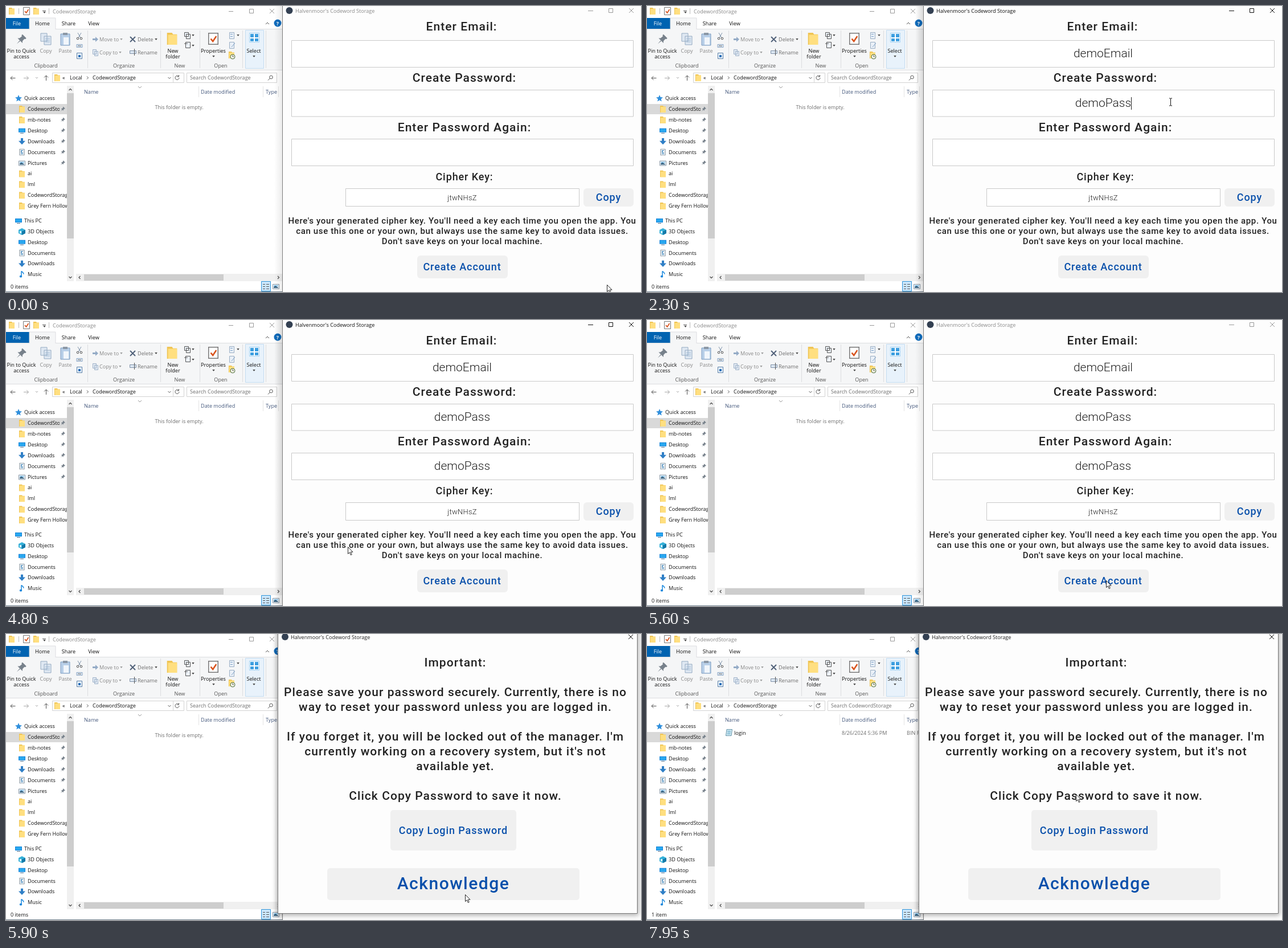
An HTML page for the animation above (8 s loop, 1115 by 502 pixels).

```html
<!DOCTYPE html>
<html lang="en">
<head>
<meta charset="utf-8">
<title>Creating an account</title>
<style>
  html, body { margin: 0; width: 100%; height: 100%; overflow: hidden; background: #fff; }
  svg { display: block; width: 100vw; height: 100vh; }
  text { font: 9.1px "Open Sans", "Noto Sans", sans-serif; fill: #111; white-space: pre; }
  .mid { text-anchor: middle; }
  .dim, .dim text { fill: #888; }
  .soft { fill: #6d6d6d; }
  .group { fill: #555; text-anchor: middle; }
  .head { fill: #44587c; }
  .line { fill: none; stroke: #555; }
  .rule { stroke: #dcdde0; fill: none; }
  .din text { font: 450 21px Roboto, sans-serif; letter-spacing: .05em; text-anchor: middle; fill: #222; }
  .din .s18 { font-size: 18px; }
  .din .s15 { font-size: 15px; letter-spacing: .043em; }
  .din .blue { fill: #0a50ab; }
  .din .typed { font-weight: 300; letter-spacing: 0; }
  .din .key { font-size: 13px; letter-spacing: .02em; font-weight: 300; }
  .field { fill: #fff; stroke: #c9c9c9; }
  .button { fill: #f0f0f0; }
  #title text { fill: #8a8a8a; }
  #title path { stroke: #999; fill: none; }
  #title.active text { fill: #111; }
  #title.active path { stroke: #111; }
</style>
</head>
<body>
<svg viewBox="0 0 1115 502" preserveAspectRatio="none">
  <defs>
    <symbol id="folder" viewBox="0 0 12 12" width="12" height="12">
      <path d="M1 0h5l1 1.500h4V12H1z" fill="#efc453"/><path d="M2 2h9v10H2z" fill="#ffdf80"/>
    </symbol>
    <symbol id="desktop" viewBox="0 0 12 12" width="12" height="12">
      <path d="M0 2h12v7H0z" fill="#1683d8"/><path d="M1 3h10v5H1z" fill="#28a8f0"/><path d="M3 10.500h6" stroke="#4a6d8c"/>
    </symbol>
    <symbol id="download" viewBox="0 0 12 12" width="12" height="12">
      <path d="M4 0h4v5h4l-6 6.500L0 5h4z" fill="#2f7fc6"/>
    </symbol>
    <symbol id="document" viewBox="0 0 12 12" width="12" height="12">
      <path d="M2 .5h8v11H2z" fill="#f7fafc" stroke="#7d8a96"/><path d="M4 3h4M4 7h4M4 9h4" stroke="#3c82b8"/><path d="M4 4h2v2H4z" fill="#3c82b8"/>
    </symbol>
    <symbol id="picture" viewBox="0 0 12 12" width="12" height="12">
      <path d="M.5 2.500h11v8H.5z" fill="#fff" stroke="#8293a3"/><path d="M2 4h8v2H2z" fill="#8ac6ee"/><path d="M2 9V7l3-2 5 3v1z" fill="#3a6685"/>
    </symbol>
    <symbol id="cube" viewBox="0 0 12 12" width="12" height="12">
      <path d="M0 3l6-3 6 3v6l-6 3-6-3z" fill="#35b0d8"/><path d="M6 5.500L12 3v6l-6 3z" fill="#1579a8"/><path d="M2 5h3v4H2z" fill="#d8f3fb"/>
    </symbol>
    <symbol id="note" viewBox="0 0 12 12" width="12" height="12">
      <path d="M5 9.500V0c1 2 4 2 4 5.500" fill="none" stroke="#1686dc" stroke-width="1.500"/><ellipse cx="4" cy="9.500" rx="2.200" ry="1.900" fill="#1686dc"/>
    </symbol>
    <symbol id="star" viewBox="0 0 12 12" width="12" height="12">
      <path d="M6 0l1.700 4 4.300.4-3.300 2.800 1 4.300L6 9.200l-3.700 2.300 1-4.300L0 4.400 4.300 4z" fill="#2f8fdc"/>
    </symbol>
    <symbol id="pin" viewBox="0 0 12 12" width="12" height="12">
      <path d="M7 1l4 4-1 1-1-.3L7 8v2L2 5h2l2.500-2L6 2zM4.300 7L1 11l4-3.300z" fill="#77818b"/>
    </symbol>
    <symbol id="check" viewBox="0 0 12 14" width="12" height="14">
      <path d="M.5.5h11v13H.5z" fill="#fff" stroke="#777"/><path d="M3 7l2.500 3L9.500 4" fill="none" stroke="#d9541e" stroke-width="1.700"/>
    </symbol>
    <symbol id="sheets" viewBox="0 0 20 22" width="20" height="22">
      <path d="M1 1h11v14H1zM7 6h12v15H7z" fill="#dfe8f2" stroke="#94aac2"/><path d="M9 10h8M9 13h8M9 16h8" stroke="#9db7d2"/>
    </symbol>
    <symbol id="down" viewBox="0 0 6 4" width="5" height="3"><path d="M0 0h6L3 4z" fill="#444"/></symbol>
    <linearGradient id="edge"><stop offset="0" stop-color="#000" stop-opacity="0"/><stop offset="1" stop-color="#000" stop-opacity=".25"/></linearGradient>
    <filter id="blur" x="-10%" y="-10%" width="120%" height="120%"><feGaussianBlur stdDeviation="4"/></filter>
    <clipPath id="explorerClip"><path d="M0 0h485v502H0z"/></clipPath>
    <clipPath id="typeClip"><path d="M450 140h28v60h-28z"/></clipPath>
    <clipPath id="sideClip"><path d="M0 140h107v343H0z"/></clipPath>
    <clipPath id="pinClip"><path d="M0 140h94v343H0z"/></clipPath>
  </defs>
  <rect width="1115" height="502" fill="#fff"/>

  <g clip-path="url(#explorerClip)">
    <use href="#folder" x="4" y="3"/><use href="#check" x="30" y="2"/><use href="#folder" x="47" y="3"/>
    <path class="line" d="M22.500 4v10M75.500 4v10" style="stroke:#bbb"/><path class="line" d="M64 8.500h6"/><use href="#down" x="65" y="10"/>
    <text class="dim" x="82" y="13">CodewordStorage</text>
    <path class="line" d="M391 9.500h8M427.500 5.500h7v7h-7zM463 5l8 8M471 5l-8 8" style="stroke:#999"/>

    <path d="M0 40h485v72H0z" fill="#f5f6f7"/><path d="M0 21h41v19H0z" fill="#0063b1"/>
    <path d="M41 41V21h46v20" fill="#f5f6f7" stroke="#dcdde0"/><path class="rule" d="M0 40.500h41M87 40.500h398M0 112.500h485"/>
    <text class="mid" x="19" y="34" style="fill:#fff">File</text><text class="mid" x="64" y="34">Home</text>
    <text class="mid" x="110" y="34">Share</text><text class="mid" x="154" y="34">View</text>
    <path class="line" d="M456 32l3-3 3 3"/><circle cx="477" cy="30" r="6.500" fill="#0f6cbd"/>
    <text class="mid" x="477" y="33.500" style="fill:#fff;font-weight:700">?</text>
    <path class="rule" d="M143.500 43v66M271.500 43v66M340.500 43v66M415.500 43v66M456.500 43v66"/>

    <use href="#pin" transform="translate(17 48) scale(1.700)"/><use href="#sheets" x="60" y="47"/>
    <path d="M96 49h16v20H96z" fill="#b8cfe8" stroke="#7c9cc0"/><path d="M100 47h8v4h-8z" fill="#8b97a5"/><path d="M101 55h9v13h-9z" fill="#f1f6fb"/>
    <path class="line" d="M126 47l5 9M132 47l-5 9" style="stroke:#8296ad"/><circle cx="126" cy="57" r="1.800" class="line"/><circle cx="132" cy="57" r="1.800" class="line"/>
    <path d="M124 67.500h10v5h-10z" fill="#e2edf8" stroke="#8ba5c2"/><path class="line" d="M126 70.500l2-1 2 1 2-1"/>
    <path d="M124.500 82.500h9v10h-9z" fill="#e9f2fb" stroke="#5b7fa6"/><path d="M127 86h4v4h-4z" fill="#2b70b8"/>
    <text class="mid" x="27" y="82">Pin to Quick</text><text class="mid" x="27" y="92">access</text>
    <g class="dim"><text class="mid" x="70" y="82">Copy</text><text class="mid" x="104" y="82">Paste</text>
      <text x="164" y="62">Move to</text><text x="164" y="85">Copy to</text></g>
    <g opacity=".5"><use href="#down" x="200" y="57"/><use href="#down" x="198" y="80"/></g>
    <path d="M152 57h5v-3l5 4.500-5 4.500v-3h-5z" fill="#94abc6"/><path d="M152.500 76.500h6v8h-6zM155.500 79.500h6v8h-6z" fill="#e2eaf3" stroke="#9fb2c8"/>
    <path d="M218 54l9 9M227 54l-9 9" stroke="#51627a" stroke-width="2"/><path d="M217.500 78.500h11v5h-11z" fill="#dbe6f2" stroke="#7f91a7"/><path class="line" d="M225.500 75v12"/>
    <text class="soft" x="231" y="62">Delete</text><text class="soft" x="231" y="85">Rename</text><use href="#down" x="261" y="57"/>
    <use href="#folder" transform="translate(281 47) scale(1.750)"/>
    <path class="line" d="M313.500 46.500h7v7h-7zM316.500 49.500h7v8h-7zM315.500 63.500h8v10h-8zM319 66h-6" style="fill:#edf3f9"/><use href="#down" x="326" y="50"/><use href="#down" x="326" y="68"/>
    <text class="mid" x="293" y="82">New</text><text class="mid" x="293" y="92">folder</text>
    <use href="#check" transform="translate(355 47) scale(1.500)"/><text class="mid" x="364" y="82">Properties</text><use href="#down" x="362" y="87"/>
    <path d="M392.500 46.500h8v11h-8zM392.500 63.500h8v11h-8z" fill="#eaf0f7" stroke="#9aaec4"/><path d="M394 49.500h4M394 53.500h4M396 72l6-7" stroke="#7ea2c8"/><use href="#down" x="405" y="50"/>
    <use href="#folder" x="390" y="80"/><circle cx="398" cy="89" r="4" fill="#f4f6e8" stroke="#4d6b3c"/><path class="line" d="M398 86.500V89h2"/>
    <path d="M420.500 42.500h32v67h-32z" fill="#e8f2fb" stroke="#c3dcf1"/>
    <path d="M427.500 47.500h17v16h-17z" fill="#fff" stroke="#9fd0f2"/><path d="M429 49h6v6h-6zM437 49h6v6h-6zM429 57h6v5h-6zM437 57h6v5h-6z" fill="#3c9ee0"/>
    <text class="mid" x="435" y="82">Select</text><use href="#down" x="433" y="87"/>
    <text class="group" x="70" y="108">Clipboard</text><text class="group" x="207" y="108">Organize</text>
    <text class="group" x="305" y="108">New</text><text class="group" x="377" y="108">Open</text>

    <path class="line" d="M16.500 126.500H8M11.500 123L8 126.500l3.500 3.500M70.500 131v-9M67 125.500l3.500-3.500 3.500 3.500"/>
    <path class="line" d="M31 126.500h8.500M36 123l3.500 3.500-3.500 3.500M52 125l2 2 2-2" style="stroke:#aaa"/>
    <path class="rule" d="M81.500 117.500h231v17h-231zM293.500 118v17M317.500 117.500h158v17h-158z" style="stroke:#d2d2d2"/>
    <use href="#folder" x="84" y="120"/><text x="99" y="129">«</text><text x="112" y="129">Local</text><text x="152" y="129">CodewordStorage</text>
    <path class="line" d="M142 123.500l2.500 2.500-2.500 2.500M284.500 125l2.500 2.500 2.500-2.500M303 123.500a3.500 3.500 0 1 0 1 2.500M303.500 121v3h-3"/>
    <text class="soft" x="323" y="129">Search CodewordStorage</text><circle class="line" cx="465.500" cy="125" r="2.800"/><path class="line" d="M463.500 127l-3.500 3.500"/>

    <path class="rule" d="M338.500 141v19M451.500 141v19M478.500 141v19" style="stroke:#e4e4e4"/><path class="line" d="M232 141l3 3 3-3" style="stroke:#999"/>
    <text class="head" x="137" y="154">Name</text><text class="head" x="342" y="154">Date modified</text><text class="head" x="456" y="154">Type</text>
    <text id="empty" class="mid soft" x="304" y="181">This folder is empty.</text>
    <g id="file">
      <path d="M140 167.500h9.500l-1.500 11h-9.500z" fill="#d9eef5" stroke="#5f91a8"/><path d="M141 170.500h6M141 173h6M140.500 175.500h6" stroke="#4f9cc0"/>
      <text x="153" y="177">login</text><text class="soft" x="342" y="177">8/26/2024 5:36 PM</text>
      <text class="soft" x="456" y="177" clip-path="url(#typeClip)">BIN File</text>
    </g>

    <path d="M0 172h107v18H0z" fill="#d9d9d9"/>
    <g id="sidebar" clip-path="url(#sideClip)"></g>
    <path d="M107 140h12v343h-12zM123 470h362v13H123z" fill="#f0f0f0"/><path d="M107 153h12v255h-12zM137 471h245v11H137z" fill="#cdcdcd"/>
    <path class="line" d="M110.500 148l2.500-2.500 2.500 2.500M110.500 475l2.500 2.500 2.500-2.500M130.500 474l-2.500 2.500 2.500 2.500M477 474l2.500 2.500-2.500 2.500" stroke-width="1.300"/>
    <text id="status" x="8" y="496">0 items</text>
    <path d="M448.500 483.500h16v17h-16z" fill="#cce8ff" stroke="#2f94d8"/><path class="line" d="M451 488.500h4M451 492.500h4M451 496.500h4M457 488.500h5M457 492.500h5M457 496.500h5"/>
    <use href="#picture" x="468" y="486"/><path d="M0 501.500h485" stroke="#72828f"/>
  </g>

  <rect id="shade" x="471" width="14" height="502" fill="url(#edge)"/>
  <path d="M485 0h630v502H485z" fill="#fdfdfd"/><path d="M485.500 0v502" stroke="#7c7c7c"/>
  <g id="title"><circle cx="497.500" cy="8" r="6" fill="#334052"/><text x="508" y="12">Halvenmoor's Codeword Storage</text>
    <path d="M1022 8.500h9M1058.500 4.500h7v7h-7zM1094 4l8 8M1102 4l-8 8"/></g>
  <g class="din">
    <path class="field" d="M501.500 60.500h600v47h-600zM501.500 147.500h600v46.500h-600zM501.500 233.500h600v47h-600zM596.500 320.500h410v31h-410z"/>
    <text x="800" y="43">Enter Email:</text><text x="805" y="133">Create Password:</text><text x="805" y="220">Enter Password Again:</text>
    <text class="s18" x="805" y="306">Cipher Key:</text>
    <text class="typed" x="801" y="90"/><text class="typed" x="801" y="177"/><text class="typed" x="801" y="263"/>
    <text class="key" x="801" y="341">jtwNHsZ</text>
    <rect class="button" x="1014" y="320" width="88" height="32" rx="6"/><text class="blue s18" x="1058" y="342">Copy</text>
    <text class="s15" x="801" y="382">Here's your generated cipher key. You'll need a key each time you open the app. You</text>
    <text class="s15" x="801" y="400">can use this one or your own, but always use the same key to avoid data issues.</text>
    <text class="s15" x="801" y="418">Don't save keys on your local machine.</text>
    <rect class="button" x="722" y="438" width="159" height="40" rx="6"/><text class="blue s18" x="801" y="464">Create Account</text>
  </g>
  <path id="caret" d="M0 0v22" stroke="#222"/>

  <g id="dialog" class="din">
    <path d="M475-10h636v504H475z" fill="#000" opacity=".3" filter="url(#blur)"/>
    <path d="M477.500-10h631v500.500h-631z" fill="#fdfdfd" stroke="#777"/>
    <circle cx="490" cy="5" r="6" fill="#334052"/><path class="line" d="M1093 1l8 8M1101 1l-8 8" style="stroke:#111"/>
    <text x="500" y="9" style="font:9.1px 'Open Sans',sans-serif;letter-spacing:0;text-anchor:start">Halvenmoor's Codeword Storage</text>
    <text x="789" y="57">Important:</text>
    <text x="789" y="109">Please save your password securely. Currently, there is no</text><text x="789" y="135">way to reset your password unless you are logged in.</text>
    <text x="789" y="187">If you forget it, you will be locked out of the manager. I'm</text><text x="789" y="213">currently working on a recovery system, but it's not</text>
    <text x="789" y="239">available yet.</text><text x="789" y="291">Click Copy Password to save it now.</text>
    <rect class="button" x="675" y="309" width="221" height="71" rx="5"/><text class="blue s18" x="785.500" y="351">Copy Login Password</text>
    <rect class="button" x="564" y="411" width="443" height="56" rx="5"/><text class="blue" x="785.500" y="448" style="font-size:30px">Acknowledge</text>
  </g>

  <path id="arrow" d="M0 0v12l2.800-2.600 2 4.600 1.900-.8-2-4.500H8.500z" fill="#fff" stroke="#111" stroke-width=".9"/>
  <path id="beam" d="M-2.500-6.500h2l.5.5.5-.5h2M0-6v12M-2.500 6.500h2l.5-.5.5.5h2" fill="none" stroke="#111"/>
</svg>
<script>
  const LOOP = 8000, STEP = 50;
  const byId = id => document.getElementById(id);
  const show = (id, on) => { byId(id).style.display = on ? '' : 'none'; };
  const within = (spans, t) => spans.find(([from, to]) => t >= from && t < to);

  // icon, label, pinned
  const quick = [
    ['folder', 'CodewordStorage', 1], ['folder', 'mb-notes', 1], ['desktop', 'Desktop', 1],
    ['download', 'Downloads', 1], ['document', 'Documents', 1], ['picture', 'Pictures', 1],
    ['folder', 'ai'], ['folder', 'lml'], ['folder', 'CodewordStorage'], ['folder', 'Grey Fern Hollow']
  ];
  const computer = [['cube', '3D Objects'], ['desktop', 'Desktop'], ['document', 'Documents'], ['download', 'Downloads'], ['note', 'Music']];
  const row = ([icon, label, pinned], x, y) =>
    `<use href="#${icon}" x="${x - 16}" y="${y - 6}"/>` +
    `<g ${pinned ? 'clip-path="url(#pinClip)"' : ''}><text x="${x}" y="${y + 3}">${label}</text></g>` +
    (pinned ? `<use href="#pin" transform="translate(95 ${y - 5}) scale(.8)"/>` : '');
  byId('sidebar').innerHTML =
    row(['star', 'Quick access'], 32, 162) + quick.map((item, i) => row(item, 38, 181 + i * 18.9)).join('') +
    row(['desktop', 'This PC'], 32, 377) + computer.map((item, i) => row(item, 38, 396 + i * 18.8)).join('');

  // time, x, y
  const path = [
    [0, 1055, 489], [300, 925, 90], [450, 925, 90], [650, 1140, 100], [1750, 1140, 100],
    [1800, 1076, 104], [1850, 965, 150], [1900, 919, 168], [2300, 919, 168], [2700, 854, 276], [3450, 854, 276],
    [3800, 389, 200], [3950, 265, 185], [4100, 201, 196], [4300, 204, 222], [4500, 300, 300],
    [4900, 700, 430], [5100, 871, 458], [5250, 792, 458], [5350, 806, 457], [6000, 806, 457],
    [6400, 660, 270], [6850, 579, 112], [6900, 572, 107], [7050, 600, 150], [7300, 790, 340],
    [7500, 760, 330], [7750, 697, 202], [7850, 715, 235], [7950, 753, 281]
  ];
  const active = [[350, 1300], [2050, 5500]];
  const entries = [[800, 'demoEmail'], [2300, 'demoPass'], [3150, 'demoPass']];
  const carets = [[350, 1300, 0], [2050, 2700, 1], [2700, 3650, 2], [4150, 4650, 2], [5200, 5500, 2]];
  const fieldTops = [60, 147, 233];
  const typed = document.querySelectorAll('.typed');

  function cursorAt(t) {
    const next = path.findIndex(p => p[0] > t);
    if (next < 0) return path[path.length - 1].slice(1);
    const [t0, x0, y0] = path[next - 1], [t1, x1, y1] = path[next];
    const k = (t - t0) / (t1 - t0);
    return [x0 + (x1 - x0) * k, y0 + (y1 - y0) * k];
  }

  function overField(x, y) {
    return x > 501 && x < 1102 && fieldTops.some(top => y > top && y < top + 48) ||
      x > 596 && x < 1007 && y > 320 && y < 352;
  }

  function draw(t) {
    const focused = Boolean(within(active, t));
    byId('title').classList.toggle('active', focused);
    byId('shade').style.opacity = focused ? .6 : .3;

    entries.forEach(([from, value], i) => { typed[i].textContent = t >= from ? value : ''; });
    const caret = within(carets, t);
    show('caret', caret);
    if (caret) {
      const field = caret[2];
      const x = Math.floor(801 + typed[field].getComputedTextLength() / 2) + .5;
      byId('caret').setAttribute('transform', `translate(${x} ${fieldTops[field] + 13})`);
    }

    const open = Math.min(1, Math.max(0, (t - 5650) / 200));
    show('dialog', open > 0);
    byId('dialog').setAttribute('opacity', open);
    const scale = .92 + .08 * open;
    byId('dialog').setAttribute('transform', `translate(793 240) scale(${scale}) translate(-793 -240)`);

    show('empty', t < 6450);
    show('file', t >= 6450);
    byId('status').textContent = t < 6950 ? '0 items' : '1 item';

    const [x, y] = cursorAt(t);
    const beam = !open && overField(x, y);
    show('beam', beam);
    show('arrow', !beam);
    byId(beam ? 'beam' : 'arrow').setAttribute('transform', `translate(${Math.round(x) + .5} ${Math.round(y) + .5})`);
  }

  const start = performance.now();
  function tick() {
    const t = (performance.now() - start) % LOOP;
    draw(Math.floor(t / STEP) * STEP);
    requestAnimationFrame(tick);
  }
  tick();
</script>
</body>
</html>
```
